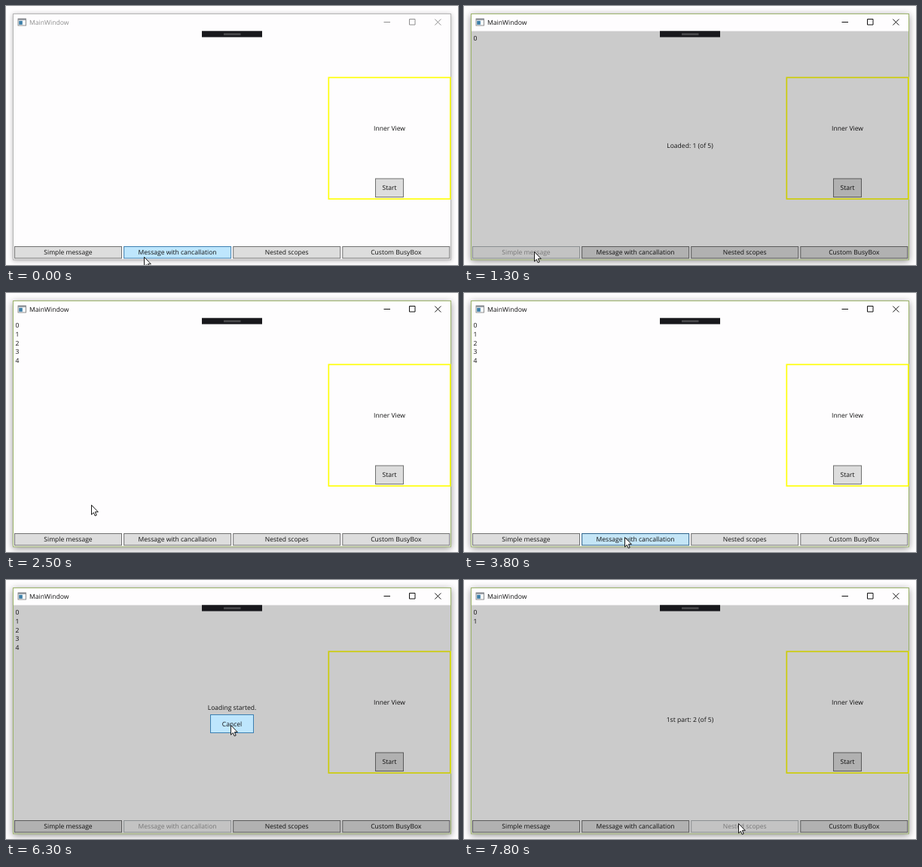
Write an HTML page that moves like this. It is 600 px wide and 345 px high and loops after 8 s.

```html
<!DOCTYPE html>
<html lang="en">
<head>
<meta charset="utf-8">
<title>Busy scopes demo</title>
<style>
  html, body { margin: 0; width: 100%; height: 100%; overflow: hidden; background: #fefdfe; }
  svg { display: block; width: 600px; height: 345px; }
  text { font: 8.55px "Open Sans", "Noto Sans", sans-serif; fill: #111; text-rendering: geometricPrecision; }
  .mid { text-anchor: middle; }
  .frame { fill: #fefdfe; stroke: #b4b4b4; filter: drop-shadow(0 1px 3px rgba(0, 0, 0, .28)); }
  .title { fill: #8e8e8e; font-size: 8.65px; }
  .tools { fill: none; stroke: #8e8e8e; }
  .active .frame { stroke: #9cb36a; filter: drop-shadow(0 2px 5px rgba(0, 0, 0, .42)); }
  .active .title { fill: #111; }
  .active .tools { stroke: #111; }
  .btn rect { fill: #ddd; stroke: #707070; }
  .btn.hover rect { fill: #bee6fd; stroke: #3c7fb1; }
  .btn.pressed rect { fill: #c4e5f6; stroke: #2c628b; }
  .btn.disabled rect { fill: #f4f4f4; stroke: #adb2b5; }
  .btn.disabled text { fill: #939393; }
  .off { display: none; }
</style>
</head>
<body>
<svg viewBox="0 0 600 345">
  <g id="win">
    <rect class="frame" x="9.5" y="10.5" width="581" height="327.5"/>
    <g>
      <rect x="16" y="17" width="10.5" height="9" fill="#f4f6f8" stroke="#777" stroke-width=".8"/>
      <rect x="16" y="16.8" width="10.5" height="2" fill="#8a8f96"/>
      <rect x="17.2" y="19.8" width="4.6" height="5" fill="#3d7fa8"/>
    </g>
    <text class="title" x="31" y="25">MainWindow</text>
    <path class="tools" d="M501.5 21.5h8.5M535.5 17.5h7.5v7.5h-7.5zM569.3 17.5l8 8m0-8l-8 8"/>
    <g id="list"></g>
    <rect x="428.3" y="95.3" width="161.5" height="161.7" fill="none" stroke="#ffff0c" stroke-width="1.7"/>
    <text class="mid" x="509" y="165.6">Inner View</text>
    <g id="buttons"></g>
    <rect id="shade" x="10" y="33.5" width="580" height="304" opacity=".2"/>
    <text id="label" class="mid" x="300"></text>
    <g id="dialog"></g>
    <rect x="260" y="33.3" width="80" height="8.2" fill="#18181c"/>
    <rect x="289" y="36.2" width="22.5" height="2.8" fill="#47474a"/>
  </g>
  <path id="cursor" d="M.5 .5V13.2L3.3 10.5 5.2 14.8 7.2 14 5.4 9.7H9.3Z" fill="#fff" stroke="#000" stroke-width=".9"/>
</svg>
<script>
const LOOP = 8000;
const NS = "http://www.w3.org/2000/svg";
const $ = id => document.getElementById(id);

function add(parent, tag, attrs, text = "") {
  const el = document.createElementNS(NS, tag);
  for (const k in attrs) el.setAttribute(k, attrs[k]);
  el.textContent = text;
  parent.append(el);
  return el;
}

function button(parent, x, y, width, height, text) {
  const g = add(parent, "g", { class: "btn" });
  add(g, "rect", { x, y, width, height });
  add(g, "text", { class: "mid", x: x + width / 2, y: y + height / 2 + 3.2 }, text);
  return g;
}

const names = ["Simple message", "Message with cancallation", "Nested scopes", "Custom BusyBox"];
const bar = names.map((name, i) => button($("buttons"), 11.5 + i * 145.1, 320.5, 142, 15.5, name));
button($("buttons"), 490.5, 230, 37, 24.5, "Start");
const cancel = button($("dialog"), 271.5, 179.5, 57, 24, "Cancel");
const rows = [0, 1, 2, 3, 4].map(i => add($("list"), "text", { x: 12.6, y: 46 + i * 11.8 }, i));

// [time, x, y] of the pointer, held until the next entry
const path = [
  [0, 183, 334], [300, 128, 331], [500, 94, 326], [800, 93, 327], [1500, 94, 324],
  [1800, 103, 302], [2000, 112, 285], [2500, 113, 282], [2800, 122, 286], [3000, 165, 305],
  [3300, 205, 322], [3500, 213, 325], [4000, 213, 326], [5000, 222, 284], [5300, 236, 262],
  [5500, 246, 248], [5800, 282, 200], [6000, 298, 193], [6800, 320, 240], [7000, 352, 306],
  [7300, 364, 324]
];

// [time, button index, state]
const states = [
  [0, 1, "hover"], [300, 0, "hover"], [1000, 0, "pressed"], [1300, 0, "disabled"], [2500, -1, ""],
  [3300, 1, "hover"], [3800, 1, "pressed"], [4000, 1, "disabled"], [6500, -1, ""],
  [7300, 2, "hover"], [7500, 2, "disabled"]
];

// Busy periods: when each row arrives and what the label says
const jobs = [
  { start: 1300, end: 2500, ticks: [1300, 1500, 1800, 2000, 2300], label: n => `Loaded: ${n} (of 5)` },
  { start: 4000, end: 6500, ticks: [4000, 4500, 5000, 5500, 6000], label: () => "Loading started.", dialog: true },
  { start: 7500, end: LOOP, ticks: [7500, 7800], label: n => `1st part: ${n} (of 5)` }
];

const last = (list, test) => list.filter(test).pop();
const show = (el, on) => el.classList.toggle("off", !on);

function draw(t) {
  const begun = e => e[0] <= t;
  const [, x, y] = last(path, begun);
  $("cursor").setAttribute("transform", `translate(${x} ${y})`);

  const [, index, state] = last(states, begun);
  bar.forEach((b, i) => b.setAttribute("class", i === index ? "btn " + state : "btn"));
  $("win").setAttribute("class", t >= 1000 ? "active" : "");

  const job = last(jobs, j => j.start <= t);
  const busy = !!job && t < job.end;
  const count = job ? job.ticks.filter(k => k <= t).length : 0;
  rows.forEach((row, i) => show(row, i < count));
  show($("shade"), busy);
  show($("label"), busy);
  show($("dialog"), busy && job.dialog);
  if (busy) {
    $("label").textContent = job.label(count);
    $("label").setAttribute("y", job.dialog ? 173.2 : 188.6);
  }
  cancel.setAttribute("class", t >= 5800 && t < 6500 ? "btn hover" : "btn");
}

const origin = performance.now();
function tick() {
  draw((performance.now() - origin) % LOOP);
  requestAnimationFrame(tick);
}
tick();
</script>
</body>
</html>
```
